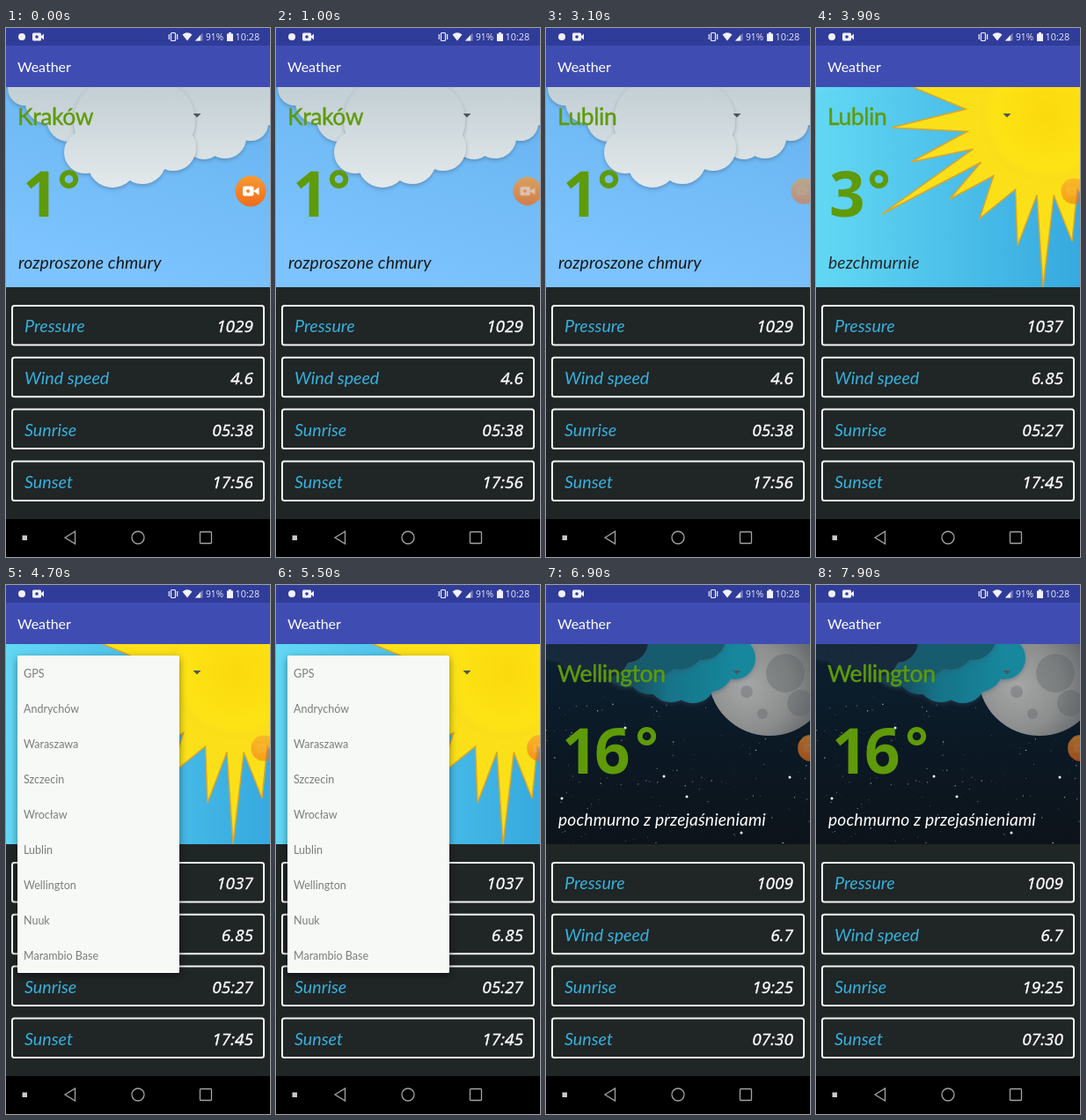
An HTML page that plays this animation: 300 px wide and 600 px high, repeating every 8000 ms.

```html
<!DOCTYPE html>
<html lang="en">
<head>
<meta charset="utf-8">
<title>Weather</title>
<style>
html, body { margin: 0; width: 100%; height: 100%; overflow: hidden; background: #202526; }
svg { display: block; width: 300px; height: 600px; font-family: Lato, sans-serif; }
.sys { fill: #e8eaf5; font-family: "Open Sans", sans-serif; }
.city { font-size: 26.5px; letter-spacing: -.4px; fill: #5f9a08; stroke: #5f9a08; stroke-width: .4px; }
.temp { font: bold 71px "Open Sans", sans-serif; fill: #5f9a08; }
.ring { font: bold 63px "Open Sans", sans-serif; fill: #5f9a08; }
.desc { font-size: 19.3px; font-style: italic; letter-spacing: .12px; }
.label { font-size: 19.7px; font-style: italic; fill: #36b1dc; }
.value { font: italic 19px "Open Sans", sans-serif; fill: #fff; stroke: #fff; stroke-width: .35px; text-anchor: end; }
.item { font-size: 12.5px; fill: #7b7d7b; }

.scene, .name { animation: 8s step-end infinite; opacity: 0; }
#cloudy { animation-name: first; }
#sunny { animation-name: second; }
#night { animation-name: third; }
#n0 { animation-name: name0; }
#n1 { animation-name: name1; }
#n2 { animation-name: name2; }
@keyframes first { 0% { opacity: 1 } 41.25%, 100% { opacity: 0 } }
@keyframes second { 0% { opacity: 0 } 41.25% { opacity: 1 } 80%, 100% { opacity: 0 } }
@keyframes third { 0% { opacity: 0 } 80%, 100% { opacity: 1 } }
@keyframes name0 { 0% { opacity: 1 } 33.75%, 100% { opacity: 0 } }
@keyframes name1 { 0% { opacity: 0 } 33.75% { opacity: 1 } 73.1%, 100% { opacity: 0 } }
@keyframes name2 { 0% { opacity: 0 } 73.1%, 100% { opacity: 1 } }

#popup { animation: popup 8s linear infinite; }
@keyframes popup {
  0%, 16.25% { opacity: 0 }
  18.75%, 33.75% { opacity: 1 }
  36.4%, 53.75% { opacity: 0 }
  56.25%, 73.1% { opacity: 1 }
  75.8%, 100% { opacity: 0 }
}
#recorder { animation: recorder 8s ease-in-out infinite; }
@keyframes recorder {
  0%, 10% { transform: translate(278px, 185px); opacity: 1 }
  15%, 62% { transform: translate(293px, 185px) scale(.84); opacity: .55 }
  71%, 100% { transform: translate(301px, 185px) scale(.86); opacity: .65 }
}
#camera { animation: camera 8s ease-in-out infinite; }
@keyframes camera {
  0%, 10% { opacity: 1 }
  15%, 100% { opacity: .12 }
}
</style>
</head>
<body>
<svg viewBox="0 0 300 600">
  <defs>
    <clipPath id="view"><rect y="67" width="300" height="227"/></clipPath>
    <linearGradient id="sky" x1="1" x2=".6" y2="1">
      <stop stop-color="#66b3ef"/><stop offset="1" stop-color="#7cc3ff"/>
    </linearGradient>
    <linearGradient id="cyan" x2="1">
      <stop stop-color="#63d8f4"/><stop offset="1" stop-color="#36a9df"/>
    </linearGradient>
    <linearGradient id="dark" x2="0" y2="1">
      <stop stop-color="#0c2030"/><stop offset=".5" stop-color="#0b1925"/><stop offset="1" stop-color="#0d131a"/>
    </linearGradient>
    <linearGradient id="puff" gradientUnits="userSpaceOnUse" x1="0" x2="0" y1="67" y2="180">
      <stop stop-color="#c3cfd4"/><stop offset="1" stop-color="#e3e9eb"/>
    </linearGradient>
    <linearGradient id="puffDim" gradientUnits="userSpaceOnUse" x1="0" x2="0" y1="67" y2="140">
      <stop stop-color="#c2cfd5"/><stop offset="1" stop-color="#d3dde1"/>
    </linearGradient>
    <linearGradient id="teal" gradientUnits="userSpaceOnUse" x1="75" x2="215" y1="0" y2="0">
      <stop stop-color="#123c4c"/><stop offset=".45" stop-color="#147388"/><stop offset="1" stop-color="#17879c"/>
    </linearGradient>
    <radialGradient id="moon" cx=".32" cy=".6" r=".72">
      <stop stop-color="#a5a6a5"/><stop offset=".5" stop-color="#8c8e8e"/><stop offset="1" stop-color="#54585b"/>
    </radialGradient>
    <radialGradient id="sun">
      <stop stop-color="#fbd90c"/><stop offset=".8" stop-color="#fde315"/><stop offset="1" stop-color="#f9dd1a"/>
    </radialGradient>
    <linearGradient id="orange" x2="0" y2="1">
      <stop stop-color="#f89a35"/><stop offset="1" stop-color="#f06c18"/>
    </linearGradient>
    <filter id="shade" x="-20%" y="-20%" width="140%" height="140%">
      <feDropShadow dx="0" dy="3" stdDeviation="4" flood-opacity=".45"/>
    </filter>
    <filter id="soft"><feDropShadow dx="0" dy="2" stdDeviation="2" flood-color="#35506a" flood-opacity=".4"/></filter>
  </defs>

  <rect width="300" height="600" fill="#202526"/>

  <g id="cloudy" class="scene">
    <g clip-path="url(#view)">
      <rect y="67" width="300" height="227" fill="url(#sky)"/>
      <g id="puffs"></g>
    </g>
  </g>
  <g id="sunny" class="scene">
    <g clip-path="url(#view)">
      <rect y="67" width="300" height="227" fill="url(#cyan)"/>
      <path id="rays" fill="#fbe019" stroke="#d9a52c" stroke-width="1.5"/>
      <circle cx="262" cy="98" r="76" fill="url(#sun)"/>
    </g>
  </g>
  <g id="night" class="scene">
    <g clip-path="url(#view)">
      <rect y="67" width="300" height="227" fill="url(#dark)"/>
      <g id="stars" fill="#dfe6ea"></g>
      <circle cx="254" cy="101" r="70" fill="url(#moon)"/>
      <g fill="#50565a" opacity=".3">
        <circle cx="272" cy="100" r="22"/><circle cx="228" cy="121" r="7"/><circle cx="246" cy="146" r="6"/>
        <circle cx="289" cy="134" r="15"/>
      </g>
      <g id="nightPuffs"></g>
    </g>
  </g>

  <g id="names"></g>
  <path d="M212.5 97h9l-4.5 4.5z" fill="#4b565c"/>
  <g id="cards" fill="none" stroke="#f4f6f6" stroke-width="2"></g>
  <g id="labels"></g>
  <g id="popup">
    <rect x="13" y="80" width="184" height="360" rx="1.5" fill="#f6f9f6" filter="url(#shade)"/>
    <g id="items"></g>
  </g>

  <g id="recorder">
    <circle r="17.5" fill="url(#orange)"/>
    <g id="camera">
      <rect x="-9" y="-5.5" width="12.5" height="11" rx="2" fill="#fff"/>
      <path d="M3 0l6.500-4.500v9z" fill="#fff"/>
      <circle cx="-3" r="2" fill="#f48128"/>
    </g>
  </g>

  <rect width="300" height="67" fill="#3f4db3"/>
  <rect width="300" height="20" fill="#303c99"/>
  <text x="13" y="49.5" font-size="16" fill="#fff">Weather</text>

  <g fill="#f1f2fa">
    <circle cx="18" cy="10" r="4"/>
    <rect x="30" y="5.5" width="10" height="9" rx="1.5"/>
    <path d="M39 10l4-3.5v7z"/>
    <circle cx="35" cy="10" r="1.8" fill="#303c99"/>
    <path d="M200.5 7.5Q206 3 211.5 7.5L206 14.5z"/>
    <path d="M215 14.5h8.5V5.5z" opacity=".4"/>
    <path d="M215 14.5h6V8z"/>
    <path d="M251 6.5h2V5h3v1.5h2v8.5h-7z"/>
  </g>
  <g fill="none" stroke="#f1f2fa" stroke-width="1.2">
    <rect x="187.5" y="5.5" width="5" height="9" rx="1"/>
    <path d="M185.3 7v6M194.7 7v6"/>
  </g>
  <text class="sys" x="227" y="13.8" font-size="10.2">91%</text>
  <text class="sys" x="260.5" y="14" font-size="10.9">10:28</text>

  <rect y="557" width="300" height="43"/>
  <rect x="18.5" y="575.5" width="5.5" height="5.5" fill="#c9c9c9"/>
  <g fill="none" stroke="#a3a3a3" stroke-width="1.3">
    <path d="M67 578l11.500-7v14z"/>
    <circle cx="150" cy="578" r="7"/>
    <rect x="220.5" y="571.5" width="13" height="13" rx="1"/>
  </g>
</svg>
<script>
const $ = id => document.getElementById(id);

function add(parent, tag, attrs, text = "") {
  const el = document.createElementNS("http://www.w3.org/2000/svg", tag);
  for (const key in attrs) el.setAttribute(key, attrs[key]);
  el.textContent = text;
  return parent.appendChild(el);
}

const write = (parent, cls, x, y, text, more) =>
  add(parent, "text", { class: cls, x, y, ...more }, text);

// A cloud is a row of [x, y, radius] lobes sharing one soft shadow.
function cloud(parent, fill, lobes) {
  const g = add(parent, "g", { fill, filter: "url(#soft)" });
  for (const [cx, cy, r] of lobes) add(g, "circle", { cx, cy, r });
}

cloud($("puffs"), "url(#puffDim)", [[22, 68, 20], [46, 84, 24], [72, 103, 26], [95, 85, 40]]);
cloud($("puffs"), "url(#puff)", [[235, 85, 50], [285, 75, 38], [225, 127, 22], [249, 124, 24], [278, 108, 20]]);
cloud($("puffs"), "url(#puff)", [[125, 105, 48], [170, 105, 45], [90, 141, 24], [121, 153, 28], [155, 150, 27], [190, 136, 26]]);

cloud($("nightPuffs"), "url(#teal)", [[92, 88, 28], [118, 98, 26], [142, 106, 27], [167, 108, 26], [186, 94, 27], [214, 83, 24]]);
cloud($("nightPuffs"), "#185b6e", [[100, 70, 28], [126, 76, 27], [152, 68, 28], [178, 58, 27]]);
cloud($("nightPuffs"), "#122c3b", [[12, 60, 24], [40, 74, 26], [68, 78, 27], [92, 64, 24]]);

// Rays: long tips joined by notches close to the disc.
const sun = { x: 262, y: 98 };
const tips = [[98, 62], [86, 113], [108, 152], [75, 211], [152, 194], [186, 216], [229, 247], [258, 294], [291, 242], [345, 225]];
const angles = tips.map(([x, y]) => {
  const a = Math.atan2(y - sun.y, x - sun.x);
  return a < -1 ? a + 2 * Math.PI : a;
});
const outline = tips.flatMap((tip, i) => {
  if (!i) return [tip];
  const a = (angles[i] + angles[i - 1]) / 2;
  return [[sun.x + 92 * Math.cos(a), sun.y + 92 * Math.sin(a)], tip];
});
$("rays").setAttribute("d", "M" + outline.join("L") + "L345 50Z");

let seed = 17;
const random = () => (seed = seed * 16807 % 2147483647) / 2147483647;
for (let i = 0; i < 150; i++)
  add($("stars"), "circle", {
    cx: random() * 300, cy: 125 + random() * 168,
    r: .25 + random() * .5, opacity: .3 + random() * .6
  });
for (const [cx, cy] of [[134, 217], [160, 240], [18, 242], [277, 218], [90, 162], [222, 281]])
  add($("stars"), "circle", { cx, cy, r: 1.5, fill: "#fff" });

["Pressure", "Wind speed", "Sunrise", "Sunset"].forEach((label, i) => {
  add($("cards"), "rect", { x: 7, y: 315 + 58.8 * i, width: 286, height: 44.5, rx: 2.5 });
  write($("labels"), "label", 21, 345 + 59 * i, label);
});

function report(id, digits, xs, ring, desc, color, values) {
  const g = $(id);
  write(g, "temp", xs, 214, digits);
  write(g, "ring", ring, 206, "°");
  write(g, "desc", 14, 272.5, desc, { fill: color });
  values.forEach((v, i) => write(g, "value", 281, 345 + 59 * i, v));
}
report("cloudy", "1", "19", 58, "rozproszone chmury", "#17191a", ["1029", "4.6", "05:38", "17:56"]);
report("sunny", "3", "15", 58, "bezchmurnie", "#22282a", ["1037", "6.85", "05:27", "17:45"]);
report("night", "16", "18 55", 101, "pochmurno z przejaśnieniami", "#fff", ["1009", "6.7", "19:25", "07:30"]);

["Kraków", "Lublin", "Wellington"].forEach((name, i) =>
  write($("names"), "name city", 13, 110, name, { id: "n" + i }));

["GPS", "Andrychów", "Waraszawa", "Szczecin", "Wrocław", "Lublin", "Wellington", "Nuuk", "Marambio Base"]
  .forEach((name, i) => write($("items"), "item", 20, 105 + 40 * i, name));
</script>
</body>
</html>
```
